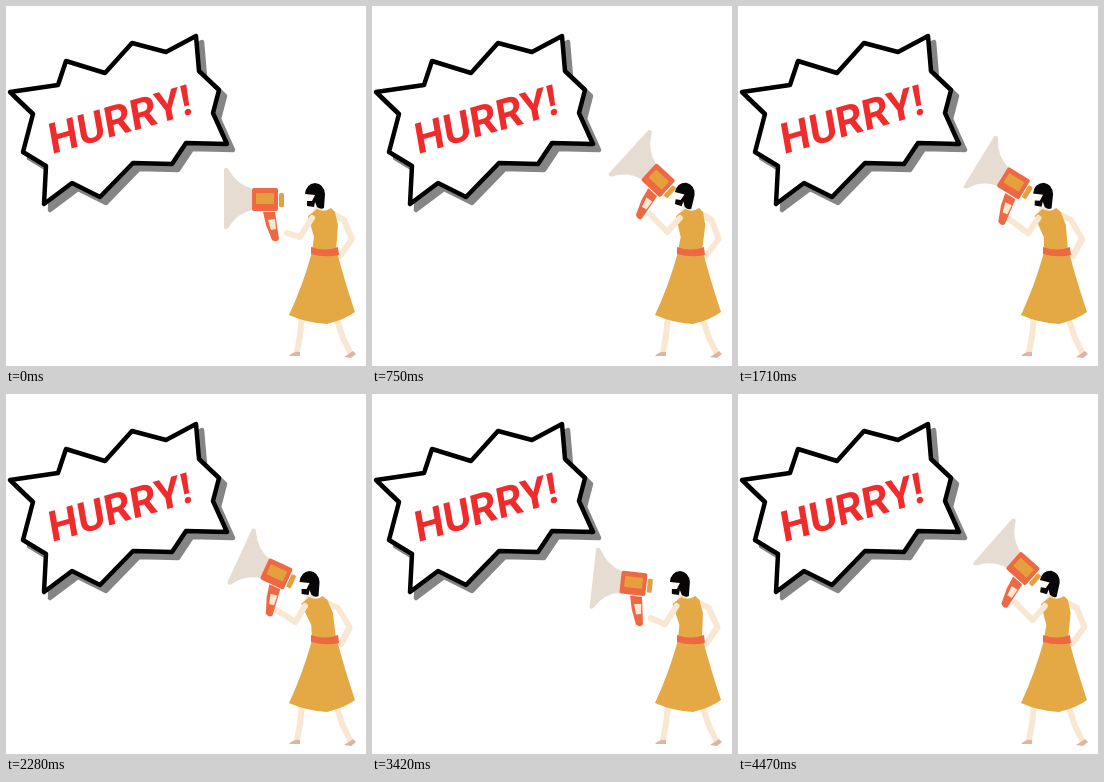
An HTML page for the animation above (4500 ms loop, 360 by 360 pixels).

```html
<!DOCTYPE html>
<html lang="en">
<head>
<meta charset="utf-8">
<title>Hurry!</title>
<style>
html, body { margin: 0; width: 100%; height: 100%; overflow: hidden; background: #fff; }
svg { display: block; width: 100vw; height: 100vh; }
#word { font: 700 40px Roboto, sans-serif; font-stretch: 62.5%; text-anchor: middle; fill: #f02b2b; }
.limb { fill: none; stroke: #f8e7d3; stroke-width: 6; stroke-linecap: round; stroke-linejoin: round; }
.dress { fill: #e4a945; }
.red { fill: #ee6844; }
.skin { fill: #f8e7d3; }
</style>
</head>
<body>
<svg viewBox="0 0 360 360">
  <defs>
    <path id="burst" stroke-width="4.5" stroke-linejoin="round" d="M4 86L52 79L60 55L99 67L126 37L160 46L190 30L193 65L213 84L207 107L221 138L180 137L166 158L127 157L94 191L66 177L38 198L40 160L17 146L27 108Z"/>
  </defs>
  <use href="#burst" x="6" y="6" fill="#858585" stroke="#858585"/>
  <use href="#burst" fill="#fff" stroke="#000"/>
  <text id="word" dy=".355em" transform="translate(114 113) rotate(-16) skewX(-6)">HURRY!</text>

  <path class="limb" d="M296 310L294 330L291 346M329 308L337 332L344 346"/>
  <path d="M283 350Q288 345 294 346L294 350ZM338 351L347 345L350 348L345 352Z" fill="#dfb5a2"/>

  <g id="torso">
    <path class="limb" d="M327 208L338 214L346 233L334 250"/>
    <path class="skin" d="M309 196H317V208H307Z"/>
    <path class="dress" d="M302 210L311 203Q318 207 325 202L329 206L332 219L330 245H306L308 231Z"/>
  </g>
  <g id="head">
    <path d="M301 186H311V201H302Z" fill="#fffaf6"/>
    <path d="M299 188Q300 178 309 177Q318 178 319 188L318 202Q315 204 311 201L309 196L308 201L301 200V195H306L309 189Z" fill="#080606"/>
  </g>
  <path class="dress" d="M306 246H331Q338 273 349 306Q340 313 321 318Q301 317 283 309Q297 279 306 246Z"/>
  <path class="red" d="M305 241Q319 246 332 241L333 249Q319 252 305 248Z"/>

  <path id="arm" class="limb"/>

  <g id="horn">
    <path class="red" d="M257 206H269L273 233Q271 237 266 234L260 219Z"/>
    <path class="skin" d="M262 214L269 213L270 223L265 224Z"/>
    <path d="M218 163Q221 160 223 164Q231 179 247 183V204Q231 207 223 221Q220 225 218 222Z" fill="#e7dcd2"/>
    <rect class="red" x="246" y="182" width="26" height="23" rx="2"/>
    <rect x="250" y="187" width="18" height="11" rx="1" fill="#e4a03c"/>
    <rect x="273" y="187" width="5" height="14" rx="1.5" fill="#e4a03c"/>
  </g>
</svg>
<script>
const LOOP = 4500, STEP = 30;
const CYCLE = 3620, RISE = 750;
const SWING = 42.5;
const el = id => document.getElementById(id);
const move = (id, value) => el(id).setAttribute("transform", value);

// Pick the narrowest installed face, at the size that fills the bubble.
function setWord() {
  const word = el("word");
  const width = name => {
    word.style.fontFamily = `"${name}", sans-serif`;
    return word.getComputedTextLength();
  };
  const faces = ["Roboto", "Noto Sans", "Open Sans"];
  const best = faces.reduce((a, b) => width(b) < width(a) ? b : a);
  word.style.fontSize = Math.min(57, 40 * 148 / width(best)) + "px";
}

// A quick lift, then a long lowering with a faster end.
function pose(t) {
  const p = t % CYCLE;
  if (p < RISE) {
    const lift = (1 - Math.cos(Math.PI * p / RISE)) / 2;
    return { lift, lean: 2 * lift };
  }
  const x = (p - RISE) / (CYCLE - RISE);
  const lift = 1 - 0.78 * x - 0.22 * x ** 8;
  return { lift, lean: 2 * lift - 9 * Math.sin(Math.PI * x) };
}

function draw(now) {
  const { lift, lean } = pose(Math.floor(now % LOOP / STEP) * STEP);
  const skew = -lean / 40;
  const handX = 281 - 5 * lift + lean, handY = 227 - 19 * lift;
  move("horn", `translate(${lean * 0.3} 0) rotate(${SWING * lift} 297 218)`);
  move("torso", `matrix(1 0 ${skew} 1 ${-skew * 245} 0)`);
  move("head", `translate(${lean * 0.7} 0) rotate(${8 * lift + lean * 0.6} 313 202)`);
  el("arm").setAttribute("d", `M${306 + lean * 0.9} 212L${294 + lean * 0.6} ${231 - 5 * lift}L${handX} ${handY}`);
}

function tick(now) {
  draw(now);
  requestAnimationFrame(tick);
}
setWord();
draw(0);
requestAnimationFrame(tick);
</script>
</body>
</html>
```
